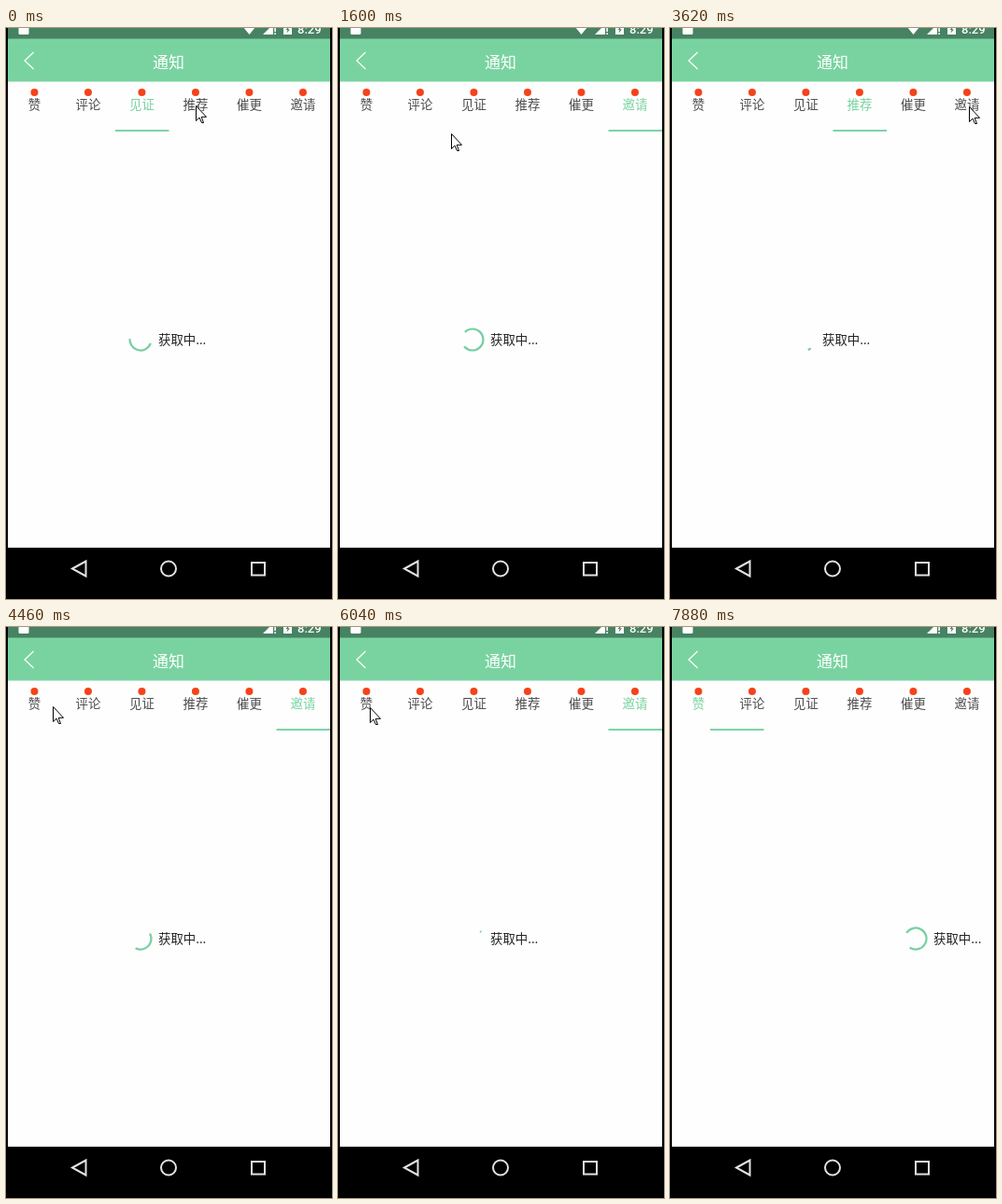
Recreate the animation shown at these times as an HTML page. Size 349x612 px, loop 8000 ms.

```html
<!DOCTYPE html>
<html lang="zh-CN">
<head>
<meta charset="utf-8">
<title>通知</title>
<style>
  html, body { margin: 0; width: 100%; height: 100%; overflow: hidden; background: #000; }
  svg { display: block; width: 100vw; height: 100vh; }
  text { font: 13.4px "Noto Sans CJK SC", "Noto Sans CJK", sans-serif; }
  .tab { fill: #4c4c4c; text-anchor: middle; }
  .tab.on { fill: #78d2a0; }
  .title { font-size: 17px; fill: #fff; text-anchor: middle; }
  .clock { font: 500 13px Roboto, sans-serif; fill: #fff; }
  .ring { fill: none; stroke: #76d0a3; stroke-width: 2.2; }
  .nav { fill: none; stroke: #e2e2e2; stroke-width: 2; }
</style>
</head>
<body>
<svg viewBox="0 0 349 612">
  <defs>
    <clipPath id="screen"><rect x="2" y="57" width="345" height="500"/></clipPath>
  </defs>
  <rect width="349" height="612"/>
  <rect x="2" width="345" height="12" fill="#478262"/>
  <rect x="2" y="11.5" width="345" height="47" fill="#79d3a0"/>
  <rect x="2" y="57.5" width="345" height="499.5" fill="#fefefe"/>

  <g fill="#fff">
    <rect x="13.5" y="-4" width="11" height="11" rx="1.5"/>
    <path id="wifi" d="M251.5-4h18l-9 11z"/>
    <path d="M275 7l11-11V7zM287.3 0h1.6v4h-1.6zM287.3 5.2h1.6V7h-1.6z"/>
    <path d="M297-4h9V7h-9z"/>
    <path d="M303-2l-3.5 4h2l-1 3.5 3.5-4h-2z" fill="#478262"/>
    <text class="clock" x="312" y="5.5">8:29</text>
  </g>

  <path d="M29.5 26l-9.5 9 9.5 9" fill="none" stroke="#fff" stroke-width="1.2"/>
  <text class="title" x="174" y="43">通知</text>

  <g id="tabs"></g>
  <rect id="bar" y="109" width="57.5" height="2" fill="#7ed3a7"/>
  <g id="pages" clip-path="url(#screen)"></g>

  <g class="nav">
    <path d="M71 579.5l14.5-8v16z"/>
    <circle cx="174" cy="579.5" r="8"/>
    <rect x="263" y="573" width="14" height="13.5"/>
  </g>
  <path id="cursor" d="M.5.5v16L4 13l2.5 5.5h2L6.2 12.3h5.3z" fill="#fff" stroke="#000"/>
</svg>
<script>
const LOOP = 8000, STEPS = 60, PAGE = 345, TAB = 57.5, LEFT = 2;
const $ = id => document.getElementById(id);

// Where the hand goes: step, x, y, and whether it taps the tab there.
const stops = [
  [0, 203, 83, true], [5, 260, 84, true], [8, 325, 85, true], [12, 121, 113],
  [16, 31, 84, true], [22, 149, 78, true], [24, 203, 82, true], [27, 320, 84, true],
  [33, 50, 85], [34, 34, 86, true], [41, 326, 91, true], [45, 34, 86, true],
  [49, 342, 274], [53, 345, 275], [55, 365, 276]
];

const tabs = ['赞', '评论', '见证', '推荐', '催更', '邀请'];
$('tabs').innerHTML = tabs.map((name, i) => {
  const x = LEFT + TAB * (i + .5) - .3;
  return `<circle cx="${x}" cy="69" r="4" fill="#f5421b"/>
    <text class="tab" x="${x}" y="87">${name}</text>`;
}).join('');
$('pages').innerHTML = `<g class="page">
  <circle class="ring" cx="144" cy="334" r="11.5" pathLength="360"/>
  <text x="163" y="339" fill="#222">获取中...</text></g>`.repeat(2);

const labels = document.querySelectorAll('.tab');
const pages = document.querySelectorAll('.page');
const rings = document.querySelectorAll('.ring');

// Fast out, slow in.
function ease(u) {
  const v = 1 - (1 - u) ** 1.6;
  return v * v * (3 - 2 * v);
}

// Each turn the tail catches up with the head, then the head runs ahead.
function spinner(n) {
  const turn = (n + 6.66) / 9.51, f = turn % 1;
  const shrink = 270 * ease(Math.min(1, 2 * f));
  const grow = 270 * ease(Math.max(0, 2 * f - 1));
  return {
    tail: 306 + 270 * Math.floor(turn) + 234 * turn + shrink,
    sweep: 276 - shrink + grow
  };
}

function hand(n) {
  const i = stops.findLastIndex(s => s[0] <= n);
  const a = stops[i], b = stops[i + 1] || a;
  const u = a === b ? 0 : 1 - (1 - (n - a[0]) / (b[0] - a[0])) ** 1.5;
  return [a[1] + (b[1] - a[1]) * u, a[2] + (b[2] - a[2]) * u];
}

function selected(n) {
  const tap = stops.findLast(s => s[3] && s[0] < n);
  return tap ? Math.floor((tap[1] - LEFT) / TAB) : 2;
}

function draw(ms) {
  const n = Math.min(STEPS - 1, Math.floor(ms / LOOP * STEPS + .03));
  const tab = selected(n);
  const nudge = .3 * Math.exp(-(((n - 51) / .6) ** 2));
  const p = nudge + .655 * Math.max(0, (n - 56) / 3) ** 2;
  const { tail, sweep } = spinner(n);
  const [x, y] = hand(n);

  labels.forEach((el, i) => el.classList.toggle('on', i === tab));
  $('bar').setAttribute('x', LEFT + TAB * (tab + p * (1 + .135 * p)));
  pages.forEach((el, i) => el.setAttribute('transform', `translate(${PAGE * (i - p)})`));
  rings.forEach(el => {
    el.setAttribute('transform', `rotate(${tail % 360} 144 334)`);
    el.setAttribute('stroke-dasharray', `${sweep} 360`);
  });
  const cx = Math.round(x - PAGE * nudge - .5), cy = Math.round(y - .5);
  $('cursor').setAttribute('transform', `translate(${cx} ${cy})`);
  $('wifi').style.display = n < 33 ? '' : 'none';
}

const start = performance.now();
function tick() {
  draw((performance.now() - start) % LOOP);
  requestAnimationFrame(tick);
}
tick();
</script>
</body>
</html>
```
